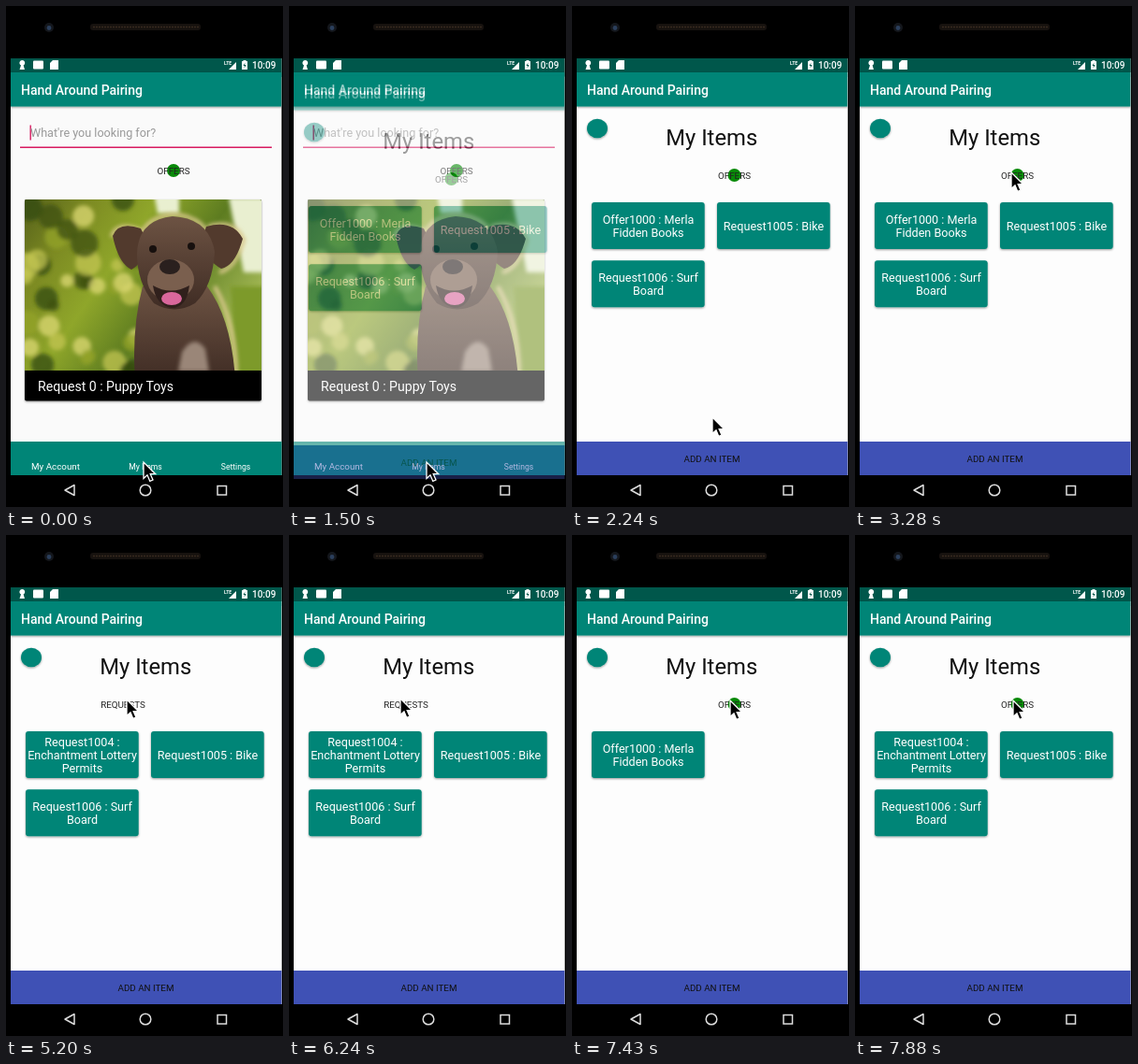
Write an HTML page that moves like this. It is 296x536 px and loops after 8000 ms.

```html
<!DOCTYPE html>
<html lang="en">
<head>
<meta charset="utf-8">
<title>Phone demo</title>
<style>
html, body { margin: 0; width: 100%; height: 100%; overflow: hidden; background: #000; }
svg { display: block; width: 296px; height: 536px; font-family: Roboto, sans-serif; }
.mid { text-anchor: middle; }
.white { fill: #fff; }
.label { font-size: 9.8px; fill: #222; text-anchor: middle; }
.card { font-size: 12.6px; fill: #fff; text-anchor: middle; }
</style>
</head>
<body>
<svg viewBox="0 0 296 536">
  <defs>
    <linearGradient id="leaves" x2="1" y2=".5">
      <stop offset="0" stop-color="#55601a"/>
      <stop offset=".22" stop-color="#7c8a22"/>
      <stop offset=".45" stop-color="#8fa62a"/>
      <stop offset=".7" stop-color="#5d7c20"/>
      <stop offset="1" stop-color="#9fb552"/>
    </linearGradient>
    <linearGradient id="fur" x2="0" y2="1">
      <stop offset="0" stop-color="#6d5343"/>
      <stop offset="1" stop-color="#3f2c24"/>
    </linearGradient>
    <filter id="soft" x="-20%" y="-20%" width="140%" height="140%"><feGaussianBlur stdDeviation="2"/></filter>
    <filter id="shade" x="-10%" y="-10%" width="120%" height="130%">
      <feDropShadow dx="0" dy="1" stdDeviation="1" flood-opacity=".4"/>
    </filter>
    <clipPath id="photo"><path d="M20 390V209q0-2 2-2H271q2 0 2 2V390z"/></clipPath>
    <g id="toolbar">
      <rect x="5" y="71" width="289.5" height="36.5" fill="#008577" filter="url(#shade)"/>
      <text class="white" x="16" y="94.7" font-size="14" font-weight="500">Hand Around Pairing</text>
    </g>
    <clipPath id="screen"><rect x="5" y="56" width="289.5" height="451"/></clipPath>
  </defs>

  <!-- phone body -->
  <rect width="296" height="536"/>
  <circle cx="46" cy="23" r="5" fill="#14171c"/>
  <circle cx="46" cy="23.5" r="2.4" fill="#2b3f5c"/>
  <rect x="90" y="19" width="118" height="7" rx="3" fill="#17120f"/>
  <path d="M93 22.5H206" stroke="#37291f" stroke-width="1.6" stroke-dasharray="2 1"/>

  <g clip-path="url(#screen)">
    <rect x="5" y="56" width="290" height="446" fill="#fafafa"/>
    <rect x="5" y="56" width="290" height="20" fill="#00574b"/>

    <g id="home">
      <use href="#toolbar"/>
      <rect id="caret" x="25.5" y="127.5" width="1.4" height="16" fill="#d81b60"/>
      <text x="26" y="140.3" font-size="12.6" fill="#999">What're you looking for?</text>
      <path d="M15 151.2H284" stroke="#d81b60" stroke-width="1.4"/>
      <circle cx="179" cy="176" r="7" fill="#088a08"/>
      <text class="label" x="179" y="179.5">OFFERS</text>
      <rect x="20" y="207" width="253" height="215.5" rx="2" filter="url(#shade)"/>
      <g clip-path="url(#photo)">
        <rect x="20" y="207" width="253" height="184" fill="url(#leaves)"/>
        <g id="bokeh" filter="url(#soft)"></g>
        <g filter="url(#soft)" fill="none" stroke="#d9c88c" stroke-width="4">
          <path d="M140 265Q141 227 178 223Q217 225 223 263M216 236Q244 228 254 250Q246 280 228 285M223 300Q246 340 246 400M144 240Q118 230 113 247"/>
        </g>
        <path d="M138 400Q134 345 146 300H215Q241 335 245 400z" fill="url(#fur)"/>
        <path d="M144 238Q120 230 114 246Q120 275 134 282Q147 275 151 252zM214 236Q242 228 253 249Q245 278 230 281Q213 272 209 250z" fill="#523a2d"/>
        <path d="M140 265Q141 229 178 225Q217 227 223 263Q221 300 202 318Q180 331 158 318Q140 296 140 265z" fill="url(#fur)"/>
        <ellipse cx="176" cy="293" rx="25" ry="22" fill="#7a5f4e"/>
        <path d="M157 299Q176 310 196 299Q193 323 177 323Q160 320 157 299z" fill="#30201c"/>
        <ellipse cx="177" cy="313" rx="11" ry="7" fill="#d9679c"/>
        <ellipse cx="175" cy="279" rx="11" ry="8" fill="#2a201e"/>
        <circle cx="157" cy="260" r="4" fill="#17100e"/>
        <circle cx="198" cy="257" r="4" fill="#17100e"/>
        <path d="M188 370Q201 350 213 367L217 391H184z" fill="#9a8678" filter="url(#soft)"/>
      </g>
      <text class="white" x="34" y="411.5" font-size="14.1">Request 0 : Puppy Toys</text>
      <rect x="5" y="466" width="290" height="36" fill="#008577"/>
      <g class="white mid" font-size="8.6">
        <text x="53" y="496" font-size="9.8">My Account</text>
        <text x="149" y="496">My Items</text>
        <text x="245.5" y="496">Settings</text>
      </g>
    </g>

    <g id="items">
      <rect x="5" y="71" width="290" height="431" fill="#fdfdfd"/>
      <use href="#toolbar"/>
      <ellipse cx="27" cy="131" rx="11" ry="10.3" fill="#008577" filter="url(#shade)"/>
      <text class="mid" x="149.2" y="148.5" font-size="23.8" fill="#111">My Items</text>
      <circle id="thumb" cy="181" r="7" fill="#088a08"/>
      <text id="state" class="label" y="184.5"></text>
      <g id="cards"></g>
      <rect x="5" y="466" width="290" height="36" fill="#3f51b5"/>
      <text class="label" x="149.5" y="487.8" style="fill:#111">ADD AN ITEM</text>
    </g>
  </g>

  <!-- status bar and navigation keys -->
  <g class="white">
    <path d="M14.5 68L16 63.5A2.9 2.9 0 1 1 18.6 63.5L20 68z"/>
    <rect x="29" y="58.5" width="11" height="9" rx="1"/>
    <path d="M47 61L50 58H56V68H47z"/>
    <text x="233" y="62.5" font-size="5" font-weight="700">LTE</text>
    <path d="M246 60V68H238z"/>
    <path d="M252 59H253.5V58H256.5V59H258V68H252z"/>
    <text x="263" y="67" font-size="10" font-weight="500">10:09</text>
  </g>
  <path d="M255.5 60.5L253.5 64H255L254.5 66.5L256.7 63H255z" fill="#00574b"/>
  <g fill="none" stroke="#ddd" stroke-width="1.5">
    <path d="M73 512.5V523.5L63 518z" stroke-linejoin="round"/>
    <circle cx="149" cy="518" r="5.8"/>
    <rect x="226" y="513.5" width="9.5" height="9.5"/>
  </g>
  <path id="cursor" d="M0 0V17.5L4 13.8L6.8 20.4L10 19L7.2 12.7H12.7z" stroke="#fff" stroke-width="1.3"/>
</svg>
<script>
const LOOP = 8000;
const $ = id => document.getElementById(id);

// Each track lists [start time, ...values]; a value holds until the next start.
const cursorTrack = [
  [0, 147, 488], [2240, 150, 440], [2390, 160, 320], [2540, 166, 226],
  [2830, 172, 196], [2980, 179, 171], [3280, 167, 178], [4020, 168, 177], [4170, 167, 177],
  [5200, 129, 176], [5350, 118, 176], [5500, 110, 177], [5650, 104, 177], [5800, 101, 177],
  [6100, 110, 176], [6240, 119, 175], [7130, 134, 176], [7280, 155, 177], [7430, 169, 177]
];
const pageTrack = [[0, 0, 0], [1500, .4, 4], [1650, 1, 3.5], [1790, 1, 0]];
const switchTrack = [
  [0, "OFFERS", 173.5], [4470, "REQUESTS", 138], [4610, "REQUESTS", 125],
  [6530, "REQUESTS", 137], [6680, "OFFERS", 166], [6830, "OFFERS", 173.5]
];

const books = ["Offer1000 : Merla", "Fidden Books"];
const permits = ["Request1004 :", "Enchantment Lottery", "Permits"];
const bike = ["Request1005 : Bike"];
const board = ["Request1006 : Surf", "Board"];
const cardTrack = [
  [0, books, bike, board], [4470, permits, bike, board],
  [6680, books], [7880, permits, bike, board]
];

const at = (track, t) => track.findLast(step => step[0] <= t);

function card(lines, i) {
  const x = i % 2 ? 155 : 21, y = i < 2 ? 210 : 272.3;
  const first = y + 29.5 - (lines.length - 1) * 7;
  const text = lines.map((s, n) =>
    `<text class="card" x="${x + 60.5}" y="${first + n * 14}">${s}</text>`).join("");
  return `<rect x="${x}" y="${y}" width="120.7" height="50" rx="3" fill="#008577" filter="url(#shade)"/>${text}`;
}

// Out-of-focus light spots behind the dog
let seed = 11;
const rand = () => (seed = seed * 16807 % 2147483647) / 2147483647;
const tones = ["#c3c552", "#dcd873", "#3c4f12", "#93a32a", "#314a10"];
$("bokeh").innerHTML = Array.from({ length: 38 }, (_, i) =>
  `<circle cx="${20 + rand() * 120}" cy="${207 + rand() * 184}" r="${6 + rand() * 9}" fill="${tones[i % 5]}" opacity=".75"/>`
).join("") + `<path d="M158 200H185V222H162zM238 205H280V285H254z" fill="#e9efd0"/>
  <path d="M240 300H280V395H245z" fill="#7d9a2a"/>`;

let shown;
function draw(now) {
  const t = now % LOOP;
  const [, x, y] = at(cursorTrack, t);
  $("cursor").setAttribute("transform", `translate(${x} ${y})`);
  $("caret").style.opacity = t >= 300 && t < 750 ? 0 : 1;

  const [, alpha, shift] = at(pageTrack, t);
  $("items").setAttribute("opacity", alpha);
  $("items").setAttribute("transform", `translate(0 ${shift})`);
  $("home").style.display = alpha < 1 ? "" : "none";

  const [, label, pos] = at(switchTrack, t);
  $("state").textContent = label;
  $("state").setAttribute("x", pos);
  $("thumb").setAttribute("cx", pos);
  $("thumb").setAttribute("opacity", label === "OFFERS" ? 1 : 0);

  const set = at(cardTrack, t);
  if (set !== shown) {
    shown = set;
    $("cards").innerHTML = set.slice(1).map(card).join("");
  }
  requestAnimationFrame(draw);
}
draw(0);
</script>
</body>
</html>
```
